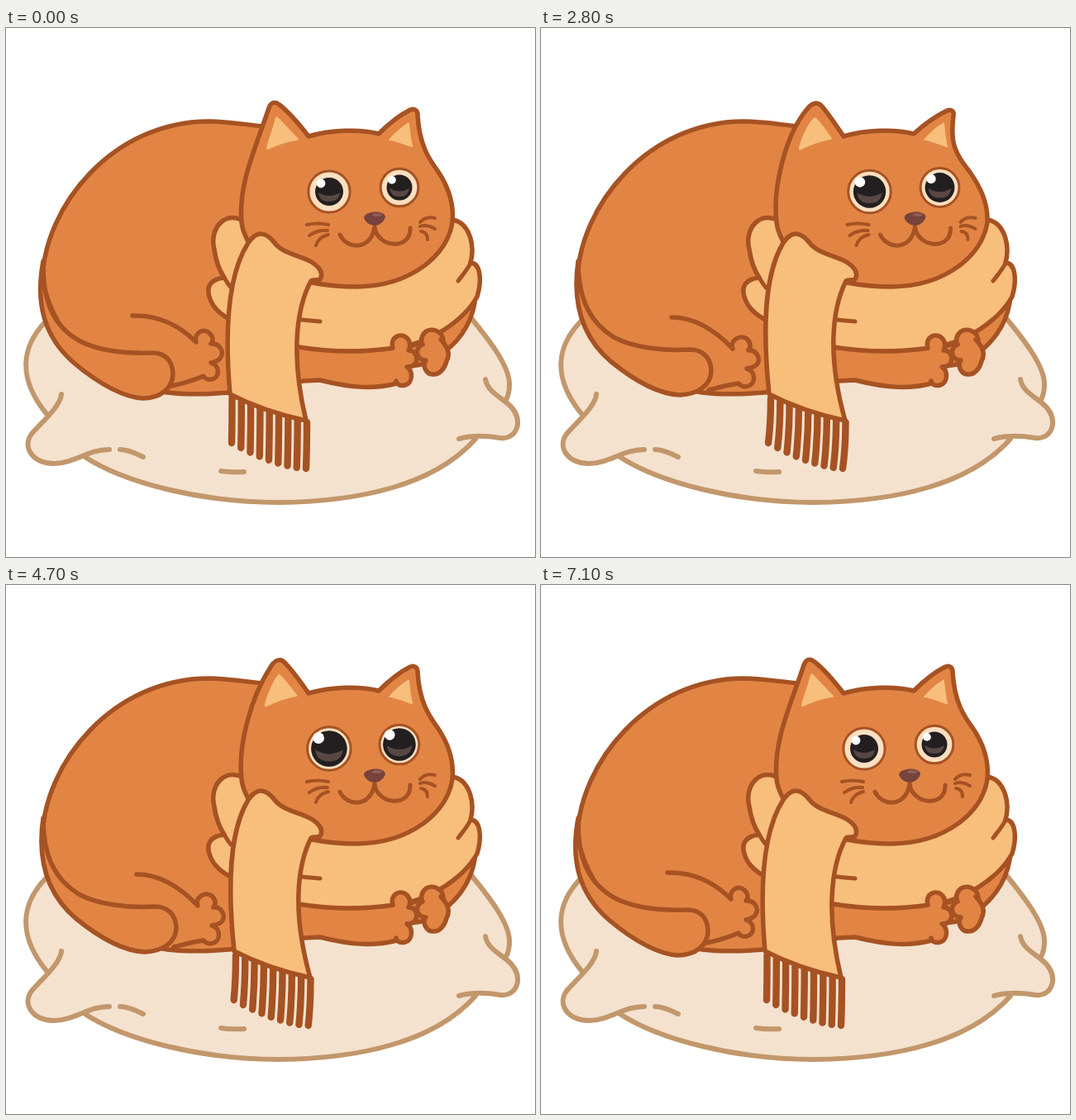
These frames come from a looping animation (640 by 640 pixels, 7.2 s). An HTML page:

```html
<!DOCTYPE html>
<html>
<head>
<meta charset="utf-8">
<style>
  html, body { margin: 0; height: 100%; overflow: hidden; background: #fff; }
  svg { display: block; width: 100vw; height: 100vh; stroke-linecap: round; stroke-linejoin: round; }
  .pillow { fill: none; stroke: #c2976b; stroke-width: 6; }
  .fur { fill: #e28544; stroke: #a65223; stroke-width: 5.5; }
  .wool { fill: #f7be7c; stroke: #a65223; stroke-width: 5.5; }
  .line { fill: none; stroke: #a65223; stroke-width: 5; }
  .ear { fill: #f7be7c; }
  .eye { fill: #fddfbf; stroke: #a65223; stroke-width: 3; }
</style>
</head>
<body>
<svg viewBox="0 0 640 640">
  <defs>
    <g id="pupil">
      <circle r="17" fill="#231f20"/>
      <path d="M-13,1Q0,9 13,1Q12,12 0,12Q-12,12 -13,1" fill="#594744"/>
      <circle cx="-10" cy="-10" r="5.4" fill="#fff"/>
    </g>
  </defs>

  <path fill="#f4e2cf" d="M48,355C20,384 12,422 50,468L31,491C20,506 30,526 58,527Q78,526 94,518C142,550 236,574 330,574C430,573 520,552 568,497L598,496C608,497 617,492 619,480C620,470 616,461 605,450Q609,440 609,432C610,410 585,378 562,350Z"/>
  <path class="pillow" d="M48,355C20,384 12,422 50,468M67,443C66,458 42,478 31,491C20,506 30,526 58,527C85,526 98,510 125,510M94,518C142,550 236,574 330,574C430,573 520,552 568,497M580,425C582,437 592,443 604,452C616,461 620,470 619,480C617,492 608,497 598,496C580,493 563,493 548,497M562,350C585,378 610,410 609,432Q609,442 605,450M138,510C148,510 158,515 166,519M260,536Q274,538 288,537"/>

  <path class="fur" d="M312,119C290,117 268,113 245,113C130,113 46,215 44,305C60,380 120,430 195,441C220,444 250,443 280,440L360,427L380,426C420,436 445,437 473,430L490,409L510,406L530,392C552,376 567,350 568,322L540,235Z"/>
  <path class="fur" id="foot"/>
  <path class="fur" id="haunch"/>

  <path class="wool" d="M285,232C262,222 246,245 252,268C254,282 258,293 264,302C248,304 242,312 246,325C250,340 262,350 290,362L354,386C390,392 430,393 470,387C515,382 555,352 570,325C576,305 574,284 562,284C568,262 560,235 540,232Z"/>
  <path class="line" d="M264,302Q268,309 272,314M562,284C560,290 553,298 547,306M350,352Q365,354 380,355M488,386L504,380"/>
  <path class="fur" d="M468,387C464,374 478,367 486,376C490,381 489,386 487,390C496,390 499,400 495,406C492,410 488,410 485,410C493,415 492,430 483,432C476,434 472,430 472,427"/>
  <path class="fur" d="M529,380C530,366 513,361 506,369C502,374 502,379 504,383C496,386 495,397 503,401C505,402 507,402 508,402C503,409 509,419 516,419C525,420 531,411 533,403C538,394 534,385 526,377"/>

  <path class="fur" id="head"/>
  <path class="ear" id="earL"/>
  <path class="ear" id="earR"/>
  <g id="face">
    <circle class="eye" id="eyeL" cx="391" cy="198"/>
    <circle class="eye" id="eyeR" cx="476" cy="193"/>
    <use href="#pupil" id="pupilL"/>
    <use href="#pupil" id="pupilR"/>
    <path class="line" d="M404,250C412,268 442,270 446,240C448,266 490,270 489,242"/>
    <path fill="#77433c" d="M433,229C435,221 457,220 459,228C458,236 449,239 446,239C441,239 434,235 433,229"/>
    <ellipse cx="449" cy="226" rx="6" ry="2" fill="#935c53"/>
  </g>
  <path class="line" id="whiskers" style="stroke-width:4" d="M364,238Q377,235 390,238M367,251Q376,244 389,245M375,263Q378,253 390,250M501,235Q508,227 519,230M501,240Q509,237 519,243M502,246Q510,247 510,256"/>

  <path class="line" id="fringe" style="stroke-width:8.4"/>
  <path class="wool" id="scarf"/>
</svg>
<script>
const LOOP = 7200, STEP = 100;
const el = id => document.getElementById(id);
const draw = (id, d) => el(id).setAttribute('d', d);
const place = (id, value) => el(id).setAttribute('transform', value);

// Eased value between [time, value] keys, held outside them
function track(t, ...keys) {
  const next = keys.findIndex(k => k[0] > t);
  if (next === 0) return keys[0][1];
  if (next < 0) return keys[keys.length - 1][1];
  const [t0, a] = keys[next - 1], [t1, b] = keys[next];
  const u = (t - t0) / (t1 - t0);
  return a + (b - a) * u * u * (3 - 2 * u);
}

// Blend the numbers of two paths that share their commands
function mix(a, b, k) {
  const goal = b.match(/-?[\d.]+/g);
  let i = 0;
  return a.replace(/-?[\d.]+/g, n => (+n + (goal[i++] - n) * k).toFixed(2));
}

// The head outline in two halves, clockwise from the left cheek
const headL = {
  rest: 'M285,235C281,190 300,150 318,97C320,90 325,88 331,93C345,104 356,118 366,131',
  left: 'M283,235C278,190 297,150 318,97C320,90 325,88 331,93C347,104 360,118 371,131',
  perked: 'M285,235C280,195 295,130 322,98C329,89 336,89 341,96C350,107 358,119 366,131'
};
const headR = {
  rest: 'C394,123 428,122 451,128C463,116 477,105 489,99C495,97 498,100 498,105C500,142 512,159 523,174C537,195 542,215 540,235',
  left: 'C399,123 433,122 457,128C465,117 473,107 480,99C484,95 488,95 491,100C505,127 517,143 527,160C540,182 542,205 540,235',
  right: 'C394,123 428,122 451,128C463,117 477,107 491,100C497,98 500,101 499,106C495,138 500,151 518,173C532,193 541,212 540,235'
};
const jaw = 'C534,275 490,312 425,313C405,313 385,311 370,308L300,270C290,255 286,245 285,235';

const earL = [
  'M329,108C336,115 345,125 353,133C355,135 354,136 351,136C338,138 326,143 317,147C315,147 315,146 315,145C318,133 323,120 326,109C327,107 328,107 329,108',
  'M333,109C340,116 346,125 351,132C353,134 351,135 349,135C336,138 325,142 315,147C312,148 312,147 312,145C315,133 321,119 329,110C330,108 332,108 333,109'
];
const earR = [
  'M486,115C478,120 470,127 464,134C462,136 463,136 466,136C474,138 482,141 490,144C492,145 492,144 492,143C490,135 489,125 488,116C488,115 487,114 486,115',
  'M482,113C476,120 470,127 464,134C462,136 463,137 466,137C476,138 486,141 496,144C499,145 499,144 498,142C493,133 489,123 485,114C484,112 483,112 482,113'
];
const haunch = [
  'M45,282C36,330 44,372 82,405C115,433 145,447 165,448C188,448 202,435 202,418C201,400 190,392 175,393C140,394 110,390 88,378C60,362 44,335 45,282',
  'M45,282C38,330 48,372 84,403C117,430 145,443 168,444C190,443 206,432 206,414C205,397 194,389 180,389C145,391 110,386 88,374C62,358 45,332 45,282'
];
const foot = [
  'M153,348C185,347 210,360 230,380C227,370 238,362 246,369C251,374 251,379 248,382C258,381 264,391 260,398C257,404 252,404 248,405C259,408 259,423 249,425C244,426 240,424 239,421C225,427 215,430 200,433',
  'M158,350C188,350 212,367 232,388C228,378 241,370 249,376C254,381 254,386 251,390C260,389 266,399 262,406C259,411 253,411 249,412C260,415 260,430 251,433C246,435 241,433 239,430C225,432 215,435 203,438'
];
const collar = 'M293,260C304,244 315,247 325,260C336,274 357,275 371,284C380,290 384,297 380,304C376,306 372,304 369,306';
const scarf = [
  collar + 'C350,341 345,400 363,475C330,468 300,458 271,443C266,385 264,305 293,260',
  collar + 'C351,342 347,400 368,475C335,468 305,458 276,443C270,385 266,305 293,260'
];

function fringe(top, tip) {
  let d = '';
  for (let i = 0; i < 9; i++) {
    const u = i / 8, x = 273.5 + 90.5 * u + top;
    const y = 502 + 31 * (1 - (1 - u) ** 1.6);
    d += `M${x},${448 + 29 * u}Q${x},${478 + 30 * u} ${273 + 90 * u + tip},${y}`;
  }
  return d;
}

function eye(side, x, y, size, wide) {
  el('eye' + side).setAttribute('r', size * (25.1 + 4 * (wide - 1)));
  place('pupil' + side, `translate(${x} ${y}) scale(${size * wide})`);
}

function render(now) {
  const t = Math.floor(now % LOOP / STEP) * STEP;
  const glances = [[1300, 0], [1900, -19], [2100, -19], [2700, 6.5], [3300, 6.5],
                   [3900, -19], [4300, -19], [4900, 6.5], [5500, 6.5]];
  const look = track(t, ...glances, [6100, 0]);
  const whiskers = track(t, ...glances, [6700, 0]);
  const left = Math.max(0, -look / 19), right = Math.max(0, look / 6.5);
  const perk = track(t, [2100, 0], [2700, 1], [3300, 1], [3900, 0], [4300, 0], [4900, 1], [5700, 0]);
  const wide = track(t, [1400, 1], [2800, 1.16], [4200, 1.24], [5300, 1.34], [5500, 1.34], [6200, 1]);
  const leg = track(t, [1300, 0], [2500, 1], [5000, 1], [6400, 0]);
  const sway = track(t, [0, 0], [2400, 1], [4800, 1], [7100, 0]);
  const tip = track(t, [1400, 0], [3500, 2.7], [4800, 2.7], [7100, 0]);

  draw('head', mix(mix(headL.rest, headL.left, left), headL.perked, perk) +
    mix(mix(headR.rest, headR.left, left), headR.right, right) + jaw);
  draw('earL', mix(...earL, perk));
  draw('earR', mix(...earR, left));
  draw('haunch', mix(...haunch, leg));
  draw('foot', mix(...foot, leg));
  draw('scarf', mix(...scarf, sway));
  draw('fringe', fringe(4.5 * sway, tip));
  place('face', `translate(${look})`);
  place('whiskers', `translate(${whiskers})`);
  eye('L', 391, 198, 1, wide);
  eye('R', 476, 193, 0.91, wide);
  requestAnimationFrame(() => render(performance.now()));
}
render(0);
</script>
</body>
</html>
```
